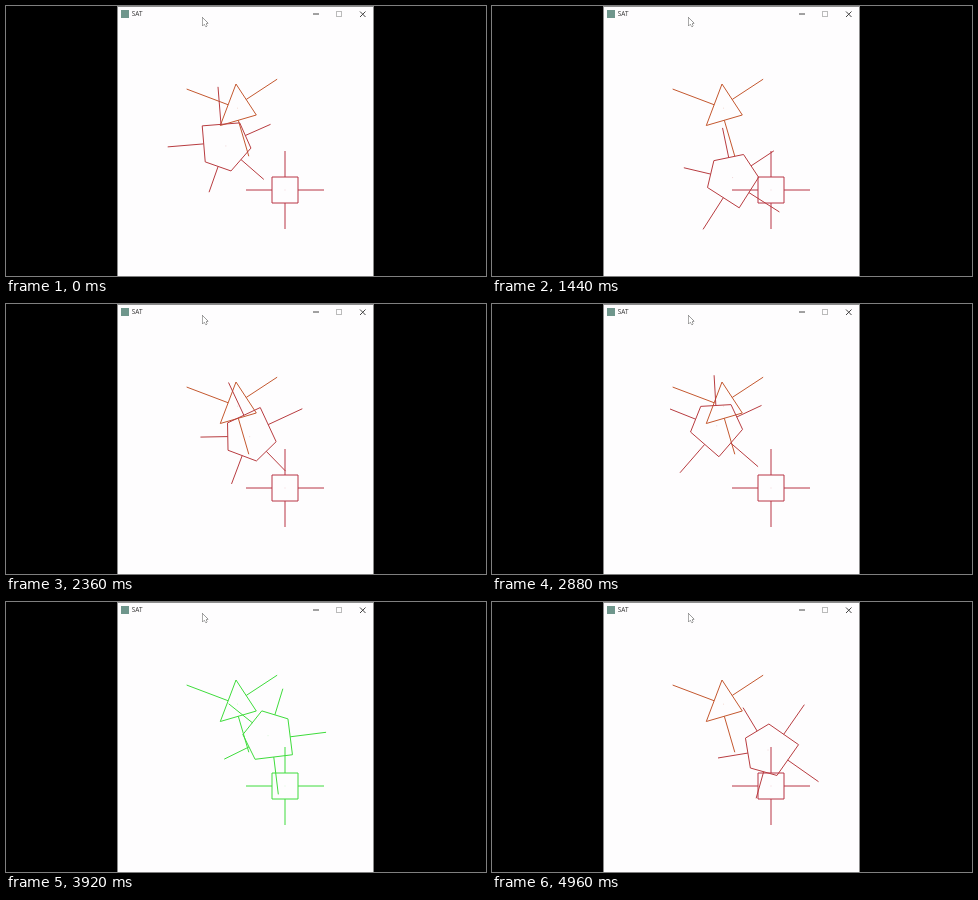
An HTML page with a canvas that plays this animation: 480 px wide and 270 px high, repeating every 5 s.

```html
<!DOCTYPE html>
<html>
<head>
<meta charset="utf-8">
<style>
  html, body { margin: 0; height: 100%; overflow: hidden; background: #000; }
  canvas { display: block; }
</style>
</head>
<body>
<canvas id="stage" width="480" height="270"></canvas>
<script>
const ctx = document.getElementById('stage').getContext('2d');
const LOOP = 5000, STEP = 40, SPIN = .3;
const GREEN = '#3fdc3c';

const triangle = [[230, 78], [250.3, 109], [214.3, 119.5]];
const square = [[266, 171], [292, 171], [292, 197], [266, 197]];
// Pentagon corners as [radius, degrees]
const corners = [[31, 225], [27, 305.6], [25.2, 9.3], [25.5, 82.7], [26, 146.8]];

// The pentagon turns at a constant speed except during these pauses
const pauses = [[80, 640], [960, 1116], [2140, 2352]];
// Its centre follows straight legs: [time, x, y]
const path = [
  [360, 219.8, 140], [960, 247.8, 170.6], [1040, 247.8, 170.6],
  [1640, 237, 172], [1880, 248.2, 160.6], [2040, 250, 146],
  [2640, 238, 121], [2880, 224.8, 121.8], [3200, 234, 121],
  [3480, 260.8, 137.8], [4320, 263.2, 129.8], [4960, 276, 148]
];

const clamp = (v, low, high) => Math.min(Math.max(v, low), high);

function angleAt(t) {
  const paused = pauses.reduce((sum, [a, b]) => sum + clamp(t - a, 0, b - a), 0);
  return SPIN * (t - paused) - 4.5;
}

function centreAt(t) {
  const end = path.findIndex(p => p[0] >= t);
  const i = clamp(end, 1, path.length - 1);
  const a = path[i - 1], b = path[i];
  const f = clamp((t - a[0]) / (b[0] - a[0]), 0, 1);
  return [a[1] + (b[1] - a[1]) * f, a[2] + (b[2] - a[2]) * f];
}

function pentagonAt(t) {
  const [x, y] = centreAt(t), turn = angleAt(t);
  return corners.map(([r, deg]) => {
    const a = (deg + turn) * Math.PI / 180;
    return [x + r * Math.cos(a), y + r * Math.sin(a)];
  });
}

// Each edge gives its midpoint and an outward normal as long as the edge
const normals = shape => shape.map(([x, y], i) => {
  const [u, v] = shape[(i + 1) % shape.length];
  return { x: (x + u) / 2, y: (y + v) / 2, nx: v - y, ny: x - u };
});

// Separating axis test
function overlap(a, b) {
  return [...normals(a), ...normals(b)].every(({ nx, ny }) => {
    const project = shape => shape.map(([x, y]) => x * nx + y * ny);
    const p = project(a), q = project(b);
    return Math.max(...p) > Math.min(...q) && Math.max(...q) > Math.min(...p);
  });
}

function line(color, ...points) {
  ctx.strokeStyle = color;
  ctx.beginPath();
  points.forEach(([x, y]) => ctx.lineTo(x, y));
  ctx.stroke();
}

function drawShape(shape, color) {
  line(color, ...shape, shape[0]);
  for (const { x, y, nx, ny } of normals(shape)) line(color, [x, y], [x + nx, y + ny]);
  const mean = n => shape.reduce((sum, p) => sum + p[n], 0) / shape.length;
  ctx.globalAlpha = .2;
  ctx.fillStyle = color;
  ctx.fillRect(mean(0) - .5, mean(1) - .5, 1, 1);
  ctx.globalAlpha = 1;
}

function drawWindow() {
  ctx.fillStyle = '#000';
  ctx.fillRect(0, 0, 480, 270);
  ctx.fillStyle = '#8c8c8c';
  ctx.fillRect(111, 0, 257, 270);
  ctx.fillStyle = '#fefdfe';
  ctx.fillRect(112, 1, 255, 269);
  ctx.fillStyle = '#6f968c';
  ctx.fillRect(115, 4, 8, 8);
  ctx.fillStyle = '#333';
  ctx.font = '6.4px "Open Sans", sans-serif';
  ctx.fillText('SAT', 125.8, 10.4);
  line('#444', [307, 8], [313, 8]);
  ctx.strokeStyle = '#bbb';
  ctx.strokeRect(330.5, 5.5, 5, 5);
  line('#444', [354, 5.5], [359.5, 11]);
  line('#444', [359.5, 5.5], [354, 11]);
}

function drawCursor() {
  const arrow = [[196.5, 11.5], [196.5, 19.5], [198.5, 18], [199.8, 20.5],
    [201, 20], [199.8, 17.5], [202, 17.2]];
  ctx.fillStyle = '#fff';
  line('#555', ...arrow, arrow[0]);
  ctx.fill();
}

function frame(now) {
  const t = Math.floor(now % LOOP / STEP) * STEP;
  const pentagon = pentagonAt(t);
  const hit = overlap(pentagon, triangle) || overlap(pentagon, square);
  drawWindow();
  drawShape(triangle, hit ? '#c4582f' : GREEN);
  drawShape(square, hit ? '#b83444' : GREEN);
  drawShape(pentagon, hit ? '#b83c40' : GREEN);
  drawCursor();
  requestAnimationFrame(frame);
}
requestAnimationFrame(frame);
</script>
</body>
</html>
```
